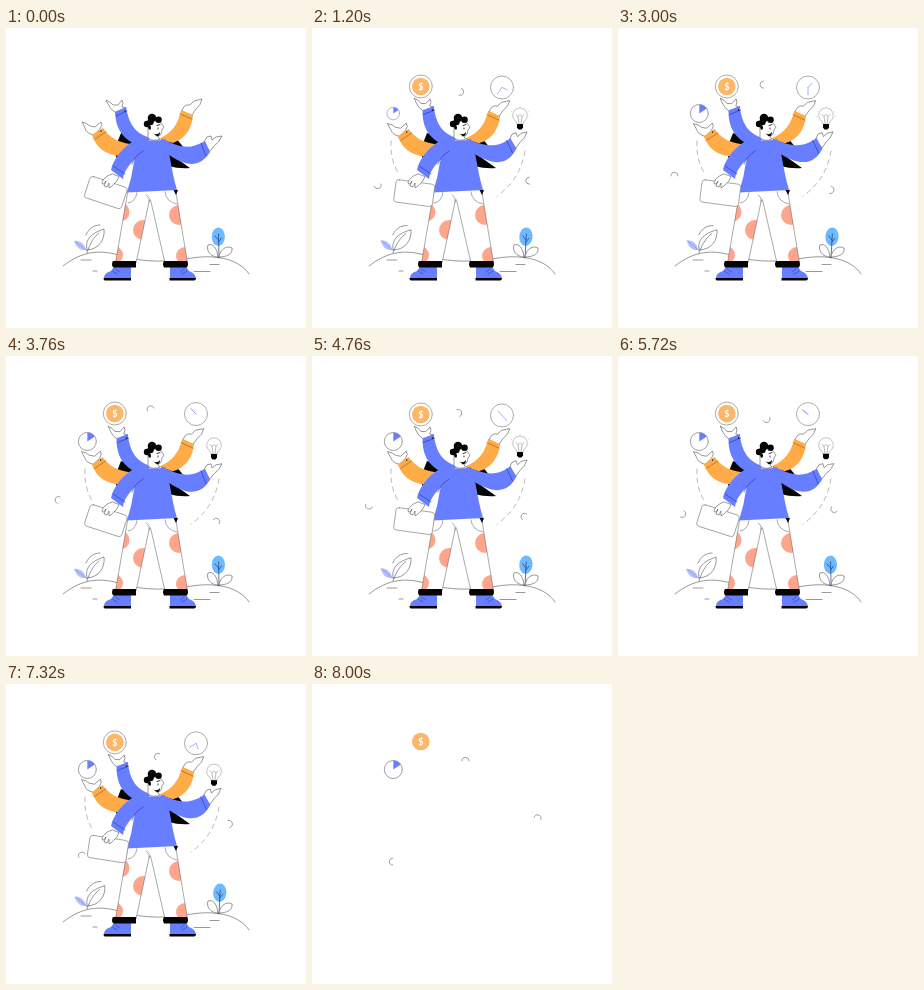
Write an HTML page with a canvas that moves like this. It is 300 px wide and 300 px high and loops after 8.04 s.

```html
<!DOCTYPE html>
<html lang="en">
<head>
<meta charset="utf-8">
<title>Many-armed juggler</title>
<style>
html, body { margin: 0; width: 100%; height: 100%; overflow: hidden; background: #fff; }
canvas { display: block; width: 300px; height: 300px; }
</style>
</head>
<body>
<canvas id="stage"></canvas>
<script>
const LOOP = 8040, STEP = 40, END = 8000;
const BLUE = '#667eff', ORANGE = '#ffab48', SALMON = '#ffa58c', INK = '#050505', LINE = '#555', PALE = '#888';
const canvas = document.getElementById('stage');
const ctx = canvas.getContext('2d');
const dpr = window.devicePixelRatio || 1;
canvas.width = canvas.height = 300 * dpr;

const RAD = Math.PI / 180;
const clamp = v => Math.max(0, Math.min(1, v));
const lerp = (a, b, k) => a + (b - a) * k;
const ease = k => 1 - Math.pow(1 - clamp(k), 3);

function shape(d, fill, stroke, width = 0.6) {
  const p = new Path2D(d);
  if (fill) { ctx.fillStyle = fill; ctx.fill(p); }
  if (stroke) { ctx.strokeStyle = stroke; ctx.lineWidth = width; ctx.stroke(p); }
}

function disc(x, y, r, fill, stroke, width = 0.7) {
  ctx.beginPath();
  ctx.arc(x, y, r, 0, 7);
  if (fill) { ctx.fillStyle = fill; ctx.fill(); }
  if (stroke) { ctx.strokeStyle = stroke; ctx.lineWidth = width; ctx.stroke(); }
}

// Runs draw() turned by deg around a pivot
function turned(x, y, deg, draw) {
  ctx.save();
  ctx.translate(x, y);
  ctx.rotate(deg * RAD);
  ctx.translate(-x, -y);
  draw();
  ctx.restore();
}

function ground() {
  shape('M57 238C76 223 94 221 116 228C140 235 162 234 186 230C212 226 234 232 243 246', null, LINE);
  shape('M75 232H85M87 243H91M188 243.500H204M204 236.500H213', null, LINE);
}

function plants(lean) {
  turned(81, 225, lean * 2.5, () => {
    shape('M68 213C73 212 79 216 80 222C74 223 70 219 68 213Z', '#b3c0ff');
    shape('M70 214L80 222', null, BLUE, 0.5);
    shape('M81 222C79 213 83 206 98 201C99 211 94 221 81 222ZM81 225C84 215 88 209 93 205', null, LINE);
    shape('M80 207C83 200 88 197 94 197', null, LINE);
  });
  turned(213, 230, lean * 4.5, () => {
    ctx.beginPath();
    ctx.ellipse(212.3, 208.7, 6.6, 9.2, 0, 0, 7);
    ctx.fillStyle = '#6dbaff';
    ctx.fill();
    shape('M213 230L212.500 206M212.500 214L215.500 210M212.500 212L209 208', null, '#223c70', 0.7);
  });
  shape('M212 229C204 229 200 222 202 217C207 215 211 220 212 229ZM213 229C214 221 221 217 226 220C227 226 221 229 213 229Z', '#fff', LINE);
}

function backArms(s, lift) {
  shape('M115 105L134 110L124 122L111 131L108 123Z', INK);
  shape('M156 110H170L178 120L162 122Z', INK);
  turned(135, 115, -1.5 * s, () => {
    shape('M87 107Q80 105 79 100L76 94Q81 95 84 98L89 99L95 94Q97 97 94 101Z', '#fff', LINE);
    shape('M86 107L97 100C104 110 112 114 124 116L115 128C102 127 91 122 86 107Z', ORANGE);
    shape('M89 111L100 104', null, '#9a5a10', 0.6);
    disc(95, 103, 0.7, INK);
  });
  turned(160, 112, 2.5 * s, () => {
    shape('M176 83Q177 78 181 77L184 77L188 73L196 71Q195 77 190 81L186 87Z', '#fff', LINE);
    shape('M175 82L187 87C186 99 181 110 167 115L153 111C167 104 172 96 175 82Z', ORANGE);
    shape('M174 86L186 91', null, '#9a5a10', 0.6);
  });
  turned(138, 112, 3 * s, () => {
    shape('M109 84C105 82 103 78 100 72Q105 74 107 77L112 77L116 72Q118 75 116 79L120 80Z', '#fff', LINE);
    shape('M109 84L120 79C123 97 130 106 145 110L136 119C119 113 110 104 109 84Z', BLUE);
    shape('M110 88L121 83', null, '#26388f', 0.6);
    disc(119, 83, 0.7, INK);
  });
  shape('M156 120L184 140Q174 141 162 138Z', INK);
  turned(162, 118, -4.5 * lift, () => {
    shape('M198 114L201 109L205 108L206 112L210 109L216 108Q213 115 208 118L204 123Z', '#fff', LINE);
    shape('M155 110C174 120 184 122 199 113L204 124C196 137 183 143 158 123Z', BLUE);
    shape('M195 115L200 128', null, '#26388f', 0.6);
  });
}

const LEGS = 'M122 162L109.500 235H130L143 174Q144 169 145 174L159 235H181.500L169.500 162Z';

function legs() {
  shape(LEGS, '#fff');
  ctx.save();
  ctx.clip(new Path2D(LEGS));
  [[114, 184, 9.5], [137, 202, 10], [108, 227, 9], [173, 187, 10], [179, 228, 9]]
    .forEach(([x, y, r]) => disc(x, y, r, SALMON));
  ctx.restore();
  shape(LEGS, null, LINE, 0.5);
  shape('M122 175Q130 174 131 164M159 164Q160 174 171 176M143 174Q144 169 140 167', null, LINE, 0.5);

  shape('M108 239H125V250H98Q98 245 105 243Z', BLUE);
  shape('M164 239H180L183 243Q189 245 190 250H164Z', BLUE);
  shape('M106 243L111 246M109 241L114 244M181 243L176 246M178 241L174 244', null, '#26388f', 0.5);
  shape('M97.500 250H125V252.500H99Q97.500 252.500 97.500 250ZM163.500 250H190Q190 252.500 188 252.500H163.500Z', INK);
  shape('M107 233H130V239.500H107Q105 236 107 233ZM158 233H181Q183 236 181 239.500H158Q156 236 158 233Z', INK);
}

function torso() {
  shape('M167 161L172 162L170 167Z', INK);
  shape('M134 111Q148 114 159 111C164 123 165 142 171 162Q145 163 121 164.500Q126 149 128 134Z', BLUE);
}

function head() {
  shape('M142 98L142 110Q147 114 154 111L152 109Q156 107 156 102L158 99L155 95L153 92H144Z', '#fff', LINE);
  [[146, 90, 4.3], [152.500, 91.800, 3.3], [141, 96, 3.2], [144.500, 94, 3.2]]
    .forEach(([x, y, r]) => disc(x, y, r, INK));
  shape('M144 97Q146 100 144 102Q142 101 142 99ZM147 105Q151 108 154 104Q154 108 151 108.500Z', INK);
  shape('M151 97.500L154 96.500M152 100V101', null, INK, 0.8);
}

function caseArm(swing) {
  turned(104, 152, 13 + 5.5 * swing, () => {
    ctx.beginPath();
    ctx.roundRect(84.500, 154, 39, 22.500, 3);
    ctx.fillStyle = '#fff';
    ctx.fill();
    ctx.strokeStyle = PALE;
    ctx.lineWidth = 0.7;
    ctx.stroke();
  });
  shape('M106 146Q99 148 96 154Q96 157 98 156L100 153L98 158L101 159L103 155L103 160L106 158Q111 154 113 149Z', '#fff', LINE);
  shape('M137 110C124 112 109 126 105 142L117 151Q118 139 137 124Z', BLUE);
  shape('M107 138L119 146M126 136Q128 129 137 123', null, '#26388f', 0.6);
}

function trails(k) {
  if (k <= 0) return;
  ctx.save();
  ctx.beginPath();
  ctx.rect(60, 112, 170, 58 * k);
  ctx.clip();
  ctx.setLineDash([4.500, 4.500]);
  shape('M79 113Q78 134 88 147M213 123Q208 152 185 168', null, PALE);
  ctx.restore();
}

function coin(y, ring) {
  if (ring) disc(108.800, y, 11.500, '#fff', '#888');
  disc(108.800, y, 8.800, '#fdb768');
  ctx.fillStyle = '#fff';
  ctx.font = 'bold 9px Lato, Arial, sans-serif';
  ctx.textAlign = 'center';
  ctx.textBaseline = 'middle';
  ctx.fillText('$', 108.800, y + 0.5);
}

function hand(x, y, deg, len) {
  ctx.beginPath();
  ctx.moveTo(x, y);
  ctx.lineTo(x + len * Math.cos(deg * RAD), y + len * Math.sin(deg * RAD));
  ctx.strokeStyle = '#8b9cff';
  ctx.lineWidth = 0.8;
  ctx.stroke();
}

function clock(y, t) {
  disc(190, y, 11.500, '#fff', '#888');
  hand(190, y, 0.18 * t - 90, 7.500);
  hand(190, y, 0.36 * t - 47, 6);
}

function pie(k) {
  if (k <= 0) return;
  ctx.save();
  ctx.translate(81.300, 85.500);
  ctx.scale(k, k);
  disc(0, 0, 9, '#fff', '#777');
  ctx.beginPath();
  ctx.moveTo(0, 0);
  ctx.arc(0, 0, 9, -90 * RAD, -34 * RAD);
  ctx.closePath();
  ctx.fillStyle = BLUE;
  ctx.fill();
  ctx.restore();
}

function bulb(y, glow) {
  ctx.save();
  ctx.translate(208, y);
  shape('M-3 7.500Q-3 5.500 -5 4A7.300 7.300 0 1 1 5 4Q3 5.500 3 7.500Z', '#fff', '#999');
  shape('M-1 7L-2 0L-4 -2M1 7L2 0L4 -2M-2 0L0 -2L2 0', null, '#777', 0.5);
  shape('M-3 7.500H3V11L1.500 13H-1.500L-3 11Z', INK);
  ctx.globalAlpha = clamp(glow);
  for (let a = 180; a <= 360; a += 30) {
    disc(9.800 * Math.cos(a * RAD), 9.800 * Math.sin(a * RAD), 0.4, '#aaa');
  }
  ctx.restore();
}

// Drifts from start to a turning point at half time, then on to the end, while spinning
function curl(t, from, mid, to, angle, rate) {
  const h = 4000, out = t < h;
  const k = out ? t / h : (t - h) / h;
  const [a, b] = out ? [from, mid] : [mid, to];
  const deg = angle + rate * t;
  const span = 88 * ease(t / 320);
  if (span <= 0) return;
  ctx.beginPath();
  ctx.arc(lerp(a[0], b[0], k), lerp(a[1], b[1], k), 3.600, (deg - span) * RAD, (deg + span) * RAD);
  ctx.strokeStyle = '#777';
  ctx.lineWidth = 0.7;
  ctx.stroke();
}

function curls(t) {
  curl(t, [149.500, 68.500], [144.500, 52.500], [153.500, 77], -90, 0.09);
  curl(t, [71.500, 163], [51.500, 143], [81, 177.500], 180, -0.09);
  curl(t, [221, 146.500], [209.500, 167], [225.500, 134.500], 285, -0.09);
}

function draw(t) {
  ctx.setTransform(dpr, 0, 0, dpr, 0, 0);
  ctx.fillStyle = '#fff';
  ctx.fillRect(0, 0, 300, 300);
  ctx.lineJoin = ctx.lineCap = 'round';

  // A two second swing that rests a little at both ends
  const swing = Math.sin(Math.cos(t * Math.PI / 1000) * Math.PI / 2);
  const lift = (1 - swing) / 2;
  const settle = ease(t / 800);
  const drop = (delay, y) => lerp(-16, y, ease((t - delay) / 640));
  const last = t >= END;

  if (!last) {
    ground();
    plants(lift);
    trails(ease((t - 300) / 700));
    backArms(settle, lift);
    legs();
    torso();
    head();
    caseArm(swing);
    clock(drop(120, 58 + 1.5 * lift), t);
    bulb(drop(200, 90.500 - 2 * lift), -swing);
  }
  coin(drop(40, 57.500 + lift), !last);
  pie(ease((t - 960) / 720));
  curls(t);
}

const start = performance.now();
function tick() {
  const t = (performance.now() - start) % LOOP;
  draw(Math.floor(t / STEP) * STEP);
  requestAnimationFrame(tick);
}
tick();
</script>
</body>
</html>
```
